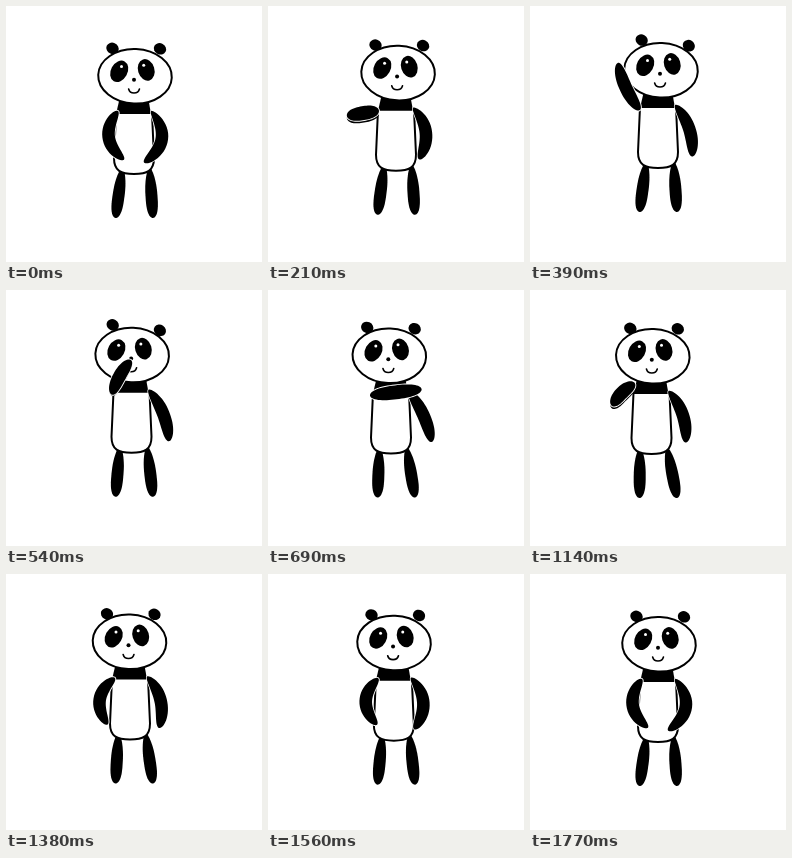
These frames come from a looping animation (256 px wide and 256 px high, 1.8 s). An HTML page with a canvas:

```html
<!DOCTYPE html>
<html lang="en">
<head>
<meta charset="utf-8">
<title>Waving panda</title>
<style>
  html, body { margin: 0; width: 100%; height: 100%; overflow: hidden; background: #fff; }
  canvas { display: block; width: 256px; height: 256px; }
</style>
</head>
<body>
<canvas id="stage" width="256" height="256"></canvas>
<script>
const LOOP = 1800, STEP = 30, LINE = 2;
const ctx = document.getElementById('stage').getContext('2d');

// The waving arm turns once around its shoulder (sx, sy); angle in degrees.
// left and bottom place the body, rest is the other hand's x.
const poses = [
  { t: 0, head: 129, left: 110, bottom: 168, sx: 112, sy: 105, angle: 83, reach: 49, rest: 138 },
  { t: 390, head: 131, left: 110, bottom: 162, sx: 110, sy: 104, angle: 245, reach: 52, rest: 162 },
  { t: 690, head: 121.3, left: 105, bottom: 163.5, sx: 102, sy: 105.5, angle: 353, reach: 52, rest: 163.5 },
  { t: 930, head: 120.3, left: 101, bottom: 165.5, sx: 106, sy: 96, angle: 523, reach: 32, rest: 150.5 },
  { t: 1140, head: 122.8, left: 103.5, bottom: 164, sx: 105, sy: 93.5, angle: 495, reach: 32, rest: 155.5 },
  { t: 1380, head: 123.5, left: 106, bottom: 165.5, sx: 109, sy: 104, angle: 459, reach: 47, rest: 153 }
];
poses.push({ ...poses[0], t: 1770, angle: poses[0].angle + 360 });

function poseAt(t) {
  const i = Math.max(1, poses.findIndex(p => p.t >= t));
  const a = poses[i - 1], b = poses[i];
  const u = (t - a.t) / (b.t - a.t);
  const p = {};
  for (const key in a) p[key] = a[key] + (b[key] - a[key]) * u;
  // Wide swings come towards the viewer and look shorter
  p.reach *= 1 - 0.4 * Math.sin(Math.PI * u) * Math.abs(b.angle - a.angle) / 180;
  return p;
}

function oval(x, y, rx, ry, turn = 0, fill = '#000') {
  ctx.beginPath();
  ctx.ellipse(x, y, rx, ry, turn, 0, Math.PI * 2);
  ctx.fillStyle = fill;
  ctx.fill();
}

function outline() {
  ctx.fillStyle = '#fff';
  ctx.fill();
  ctx.strokeStyle = '#000';
  ctx.lineWidth = LINE;
  ctx.stroke();
}

// Blunt leaf from a to b, bowed sideways by bend; skew moves the widest part
function limb(ax, ay, bx, by, { bend = 0, half = 6.3, skew = 1.15, halo = 0 }) {
  const len = Math.hypot(bx - ax, by - ay);
  const ex = (bx - ax) / len, ey = (by - ay) / len;
  const edge = [];
  for (let i = 0; i < 64; i++) {
    const phase = i * Math.PI / 32;
    const u = (1 - Math.cos(phase)) / 2;
    const s = 2 * u ** skew - 1;
    const w = half * Math.sqrt(Math.max(0, 1 - Math.abs(s) ** 2.6)) * (i < 32 ? 1 : -1);
    const bow = 4 * bend * u * (1 - u);
    // Direction of the bowed middle line
    const slope = Math.atan(4 * bend * (1 - 2 * u) / len);
    const along = u * len - w * Math.sin(slope);
    const side = bow + w * Math.cos(slope);
    edge.push([ax + ex * along - ey * side, ay + ey * along + ex * side]);
  }
  ctx.beginPath();
  edge.forEach(p => ctx.lineTo(...p));
  ctx.closePath();
  if (halo) {
    ctx.strokeStyle = '#fff';
    ctx.lineWidth = halo;
    ctx.stroke();
  }
  ctx.fillStyle = '#000';
  ctx.fill();
}

function drawBody(left, bottom) {
  const right = left + 36, top = bottom - 61, mid = left + 18;
  const leg = { half: 6, skew: 1.35 };
  limb(left + 6.5, bottom - 7, 109.5, bottom + 44, leg);
  limb(left + 33.5, bottom - 7, 147, bottom + 44, leg);

  ctx.beginPath();
  ctx.moveTo(left + 4, top - 16);
  ctx.lineTo(right - 4, top - 16);
  ctx.lineTo(right - 1, top + 1);
  ctx.lineTo(left, top + 1);
  ctx.fill();

  ctx.beginPath();
  ctx.moveTo(left, top);
  ctx.lineTo(right, top);
  ctx.lineTo(right + 2, bottom - 16);
  ctx.bezierCurveTo(right + 2, bottom - 3, right - 5, bottom, mid, bottom);
  ctx.bezierCurveTo(left + 5, bottom, left - 2, bottom - 3, left - 2, bottom - 16);
  ctx.closePath();
  outline();
}

function drawHead(x, y, lean) {
  ctx.save();
  ctx.translate(x, y);
  ctx.save();
  ctx.rotate(lean);
  oval(-22.5, -28, 6.3, 5.6, 0.4);
  oval(25, -27.5, 6.3, 5.6, 0.5);
  ctx.restore();

  ctx.beginPath();
  ctx.ellipse(0, 0, 36.8, 27.3, 0.04, 0, Math.PI * 2);
  outline();

  oval(-15.8, -5, 8.3, 11.3, 0.5);
  oval(11.2, -6.4, 8.2, 11, -0.3);
  oval(-13.5, -9.8, 1.5, 1.5, 0, '#fff');
  oval(8.7, -11, 1.5, 1.5, 0, '#fff');
  oval(-1, 3.5, 2, 2);

  ctx.beginPath();
  ctx.moveTo(-6.3, 12.8);
  ctx.bezierCurveTo(-5, 18, 3, 18, 4.4, 12.8);
  ctx.lineWidth = 1.7;
  ctx.stroke();
  ctx.restore();
}

function drawRestingArm({ left, bottom, rest }) {
  const x = left + 35;
  limb(x, bottom - 63, rest, bottom - 11.5, { bend: 0.35 * (rest - x) - 12, halo: 1.4 });
}

function drawWavingArm({ sx, sy, angle, reach }) {
  const a = angle * Math.PI / 180, s = Math.sin(a);
  const hx = sx + reach * Math.cos(a), hy = sy + reach * s;
  // A hanging arm bows outwards, a raised one slightly back
  const bend = s ** 3 * (8.5 + 4.5 * s) * reach / 50;
  const style = { bend, half: 7 - 0.7 * s * s, skew: 1 };
  // A shortened arm shows its upper half below the forearm
  const fold = Math.min(2.5, Math.max(0, (45 - reach) / 5));
  if (fold) limb(sx, sy + fold, hx, hy + fold, style);
  limb(sx, sy, hx, hy, { ...style, halo: 1.8 });
}

function draw(t) {
  ctx.fillStyle = '#fff';
  ctx.fillRect(0, 0, 256, 256);
  ctx.lineCap = ctx.lineJoin = 'round';

  const p = poseAt(t);
  // The head leans while the hand is up
  const raised = Math.max(0, -Math.sin(p.angle * Math.PI / 180));
  drawBody(p.left, p.bottom);
  drawHead(p.head, p.bottom - 97.7, 0.12 * raised);
  drawRestingArm(p);
  drawWavingArm(p);
}

function tick() {
  const t = performance.now() % LOOP;
  draw(Math.min(1770, Math.floor(t / STEP) * STEP));
  requestAnimationFrame(tick);
}
tick();
</script>
</body>
</html>
```
